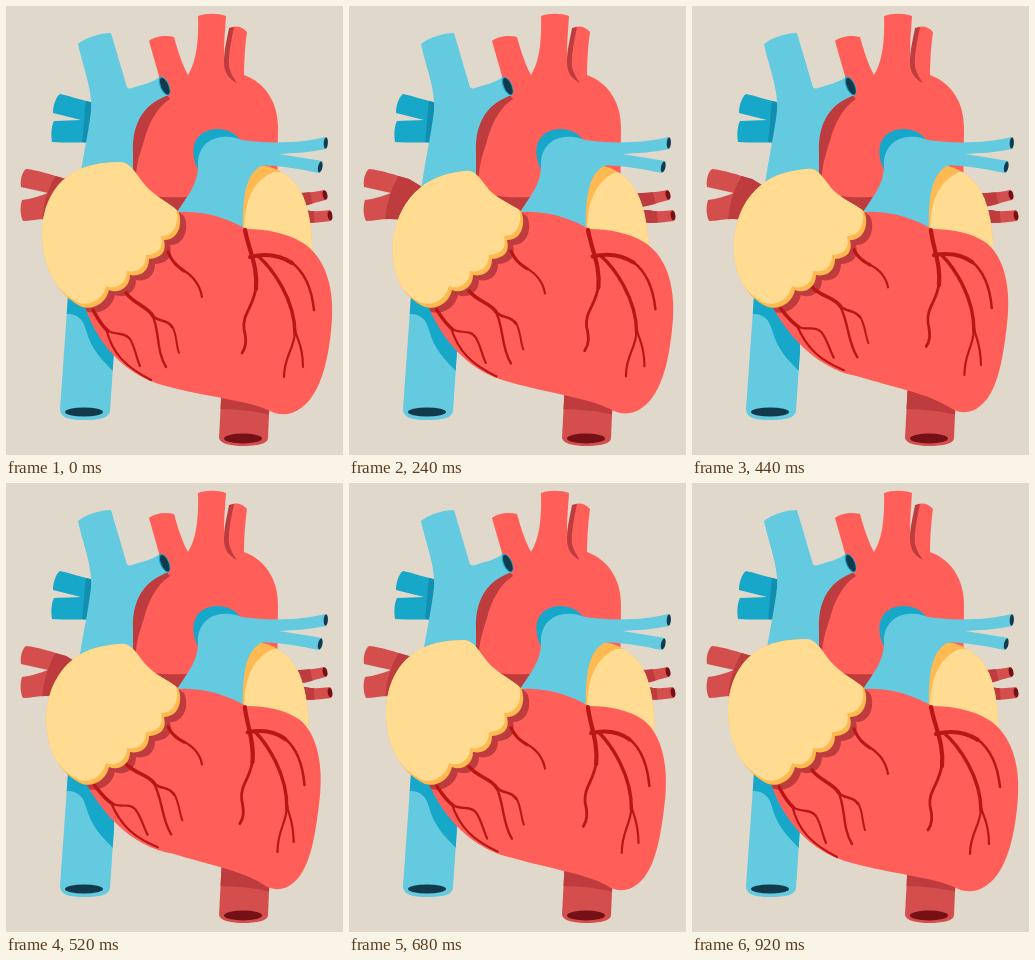
An HTML page with a canvas for the animation above (960 ms loop, 337x449 px).

```html
<!DOCTYPE html>
<html lang="en">
<head>
<meta charset="utf-8">
<title>Beating heart</title>
<style>
html, body { margin: 0; width: 100%; height: 100%; overflow: hidden; background: #e0d8cb; }
canvas { display: block; }
</style>
</head>
<body>
<canvas id="stage" width="337" height="449"></canvas>
<script>
const ctx = document.getElementById('stage').getContext('2d');
const LOOP = 960, STEP = 40;
const C = {
  paper: '#e0d8cb', sky: '#64cae0', teal: '#17a7c9', tealDark: '#128fb0', navy: '#113b4d',
  red: '#ff5f58', brick: '#d44e4e', shade: '#be3c3e', vein: '#ba1616', maroon: '#741016',
  cream: '#ffdc91', amber: '#ffb951'
};

const clamp = x => Math.min(1, Math.max(0, x));
const ease = x => (1 - Math.cos(Math.PI * clamp(x))) / 2;
const pulse = (t, a, b, c, d) => ease((t - a) / (b - a)) - ease((t - c) / (d - c));

// Moves every "x,y" pair of a path through a deformation.
const bend = (d, move) => new Path2D(d.replace(/([\d.]+),([\d.]+)/g, (_, x, y) => move(+x, +y).join()));

function fill(path, color, dx = 0, dy = 0) {
  ctx.save();
  ctx.translate(dx, dy);
  ctx.fillStyle = color;
  ctx.fill(typeof path === 'string' ? new Path2D(path) : path);
  ctx.restore();
}

function inside(path, draw) {
  ctx.save();
  ctx.clip(typeof path === 'string' ? new Path2D(path) : path);
  draw();
  ctx.restore();
}

function hole(x, y, rx, ry, color, turn = 0) {
  ctx.fillStyle = color;
  ctx.beginPath();
  ctx.ellipse(x, y, rx, ry, turn, 0, 2 * Math.PI);
  ctx.fill();
}

const LEFT_VEINS = 'M20,163 C32,164 46,169 60,173 L80,185 L70,214 L40,213 C32,213 24,215 17,215 C14,209 14,200 16,194 C25,193 34,190 42,187 C33,185 24,183 15,181 C14,174 16,166 20,163 Z';
const RIGHT_VEINS = 'M275,188 C292,187 306,187 318,184 C322,186 322,192 320,194 C310,196 303,199 297,200 L275,205 Z M280,204 L299,204 C308,206 316,205 324,204 C327,207 327,213 325,215 C316,216 308,217 300,217 L280,215 Z';
const LOWER_CAVA = 'M62,290 L54,403 C54,412 64,414 78,414 C94,414 103,412 104,405 L108,345 L108,290 Z';
const BOTTOM_TUBE = 'M216,375 L213,432 C214,438 226,440 237,440 C250,440 262,438 262,432 L264,385 Z';
const AORTA = 'M143,35 C149,30 160,29 168,31 C172,46 177,60 182,69 C189,58 193,40 192,10 C200,7 212,7 220,10 C219,28 217,42 219,58 C222,45 222,33 224,22 C230,19 237,21 241,26 C239,40 238,56 238,69 C260,77 272,97 272,122 L271,205 L150,205 L127,172 L127,140 C130,115 152,95 153,70 Z';
const UPPER_CAVA = 'M72,38 C81,31 94,27 105,27 L120,78 C121,83 123,83 126,82 C135,79 146,77 154,71 L163,89 C140,97 126,114 127,146 L127,185 L72,185 C75,160 82,130 85,105 C87,84 76,58 72,38 Z';
const ARTERY = 'M171,206 C181,191 192,178 192,160 C191,144 201,132 216,131 C225,130 230,132 236,134 C262,138 298,137 319,131 C322,134 322,140 320,143 C302,147 287,147 273,148 C288,150 302,153 316,155 C317,159 316,164 313,167 C292,163 266,158 255,160 C240,168 236,190 237,226 C215,220 190,215 171,206 Z';
const RIGHT_ATRIUM = 'M237,230 C228,200 234,162 255,159 C275,162 289,173 297,190 C304,207 307,230 306,252 L260,260 Z';
const RIGHT_ATRIUM_LIGHT = 'M238,230 C238,205 241,178 267,166 L320,165 L320,260 L260,260 Z';
const LEFT_ATRIUM = 'M172,205 C177,215 174,234 158,234 C161,246 155,252 143,253 C143,265 135,271 124,269 C124,282 112,288 103,284 C100,297 88,304 76,301 C50,288 36,260 36,226 C37,200 47,181 62,170 C76,159 96,156 115,156 C124,157 130,167 138,178 C148,190 162,196 172,205 Z';
const VENTRICLE = 'M163,207 C192,202 222,212 240,223 C260,223 281,227 297,237 C319,251 328,281 326,312 C324,350 315,389 295,402 C285,410 272,410 262,404 C240,394 200,391 160,380 C126,372 94,345 79,301 Z';

const VESSELS = [
  [4.2, 'M239,224 C243,245 252,260 250,283'],
  [2.8, 'M250,281 C248,300 236,308 238,323 C241,335 240,341 236,347'],
  [4, 'M244,251 C260,247 275,250 286,257'],
  [2.5, 'M285,256 C300,267 306,285 308,304'],
  [3.4, 'M252,250 C266,262 289,293 289,328'],
  [2.2, 'M289,324 C291,334 297,338 297,361'],
  [2.2, 'M289,326 C288,344 278,350 278,371'],
  [3.2, 'M162,246 C166,256 171,260 178,265'],
  [2.2, 'M177,264 C187,270 194,279 196,291'],
  [3.6, 'M120,287 C128,298 141,300 147,310'],
  [2.4, 'M146,308 C154,325 150,345 160,361'],
  [2.6, 'M146,309 C152,317 161,312 166,321'],
  [2, 'M166,320 C171,328 170,339 173,347'],
  [3.4, 'M87,304 C92,313 95,319 102,325'],
  [2.2, 'M101,324 C108,330 118,325 124,333 C129,341 130,351 134,360'],
  [2.2, 'M100,322 C106,348 120,361 145,374']
];

// Pull towards the scalloped rim, which stays fixed.
const squeezeLeft = amount => (x, y) => {
  const k = amount * Math.max(0, (173 - x) * 94 + (206 - y) * 97) / 11200;
  return [x + 8 * k * clamp((180 - x) / 130), y + 9.6 * k];
};

const squeezeRight = amount => (x, y) => {
  const k = amount * clamp((x - 240) / 60);
  return [x - 6.5 * k, y + 3 * k];
};

// The left and lower walls contract before the right wall does.
const squeezeVentricle = (early, late) => (x, y) => {
  const pull = x < 215 ? early * ease((y - 285) / 85) : late * ease((y - 215) / 50);
  const waist = 3 * late * clamp((x - 270) / 50) * Math.exp(-(((y - 345) / 28) ** 2));
  const lift = early * ease((y - 222) / 75) * clamp((x - 75) / 70) * (10 - 8 * clamp((x - 215) / 50));
  return [x - pull * 0.1 * (x - 215) - waist, y - lift];
};

function drawVeinsBehind() {
  fill(LEFT_VEINS, C.brick);
  inside(LEFT_VEINS, () => fill('M52,166 C43,180 37,196 36,217 L90,217 L90,166 Z', C.shade));
  fill(RIGHT_VEINS, C.brick);
  inside(RIGHT_VEINS, () => fill('M270,180 L302,180 C306,192 308,204 309,220 L270,220 Z', C.shade));
  hole(319, 189, 2.3, 4.6, C.maroon, -0.2);
  hole(324, 209.5, 2.3, 4.6, C.maroon, -0.15);
}

function drawTubes() {
  fill(LOWER_CAVA, C.sky);
  inside(LOWER_CAVA, () =>
    fill('M50,308 L62,308 C71,308 77,313 80,324 C85,343 96,354 108,366 L115,280 L50,280 Z', C.teal));
  hole(78, 406, 19, 4.5, C.navy);

  fill(BOTTOM_TUBE, C.brick);
  inside(BOTTOM_TUBE, () => fill('M210,403 C230,403 250,405 268,410 L268,370 L210,370 Z', C.shade));
  hole(237, 432.5, 19, 5, C.maroon);
}

function drawGreatVessels(right) {
  fill(AORTA, C.red);
  fill('M163,89 C140,97 126,114 127,146 L127,176 C130,188 139,192 150,193 L180,191 L171,208 L127,208 Z', C.red);
  fill('M164,93 C150,102 142,119 138,135 C133,150 129,163 130,178 L124,176 L126,140 C128,112 142,96 160,88 Z', C.shade);
  fill('M130,183 C140,191 160,192 181,191 L170,208 L130,208 Z', C.shade);
  fill('M223,22 L228,21 C225,36 222,50 223,61 C225,68 228,73 231,77 C223,73 218,67 218,56 C218,44 221,33 223,22 Z', C.shade);

  fill('M54,88 C64,90 75,94 88,97 L88,137 C73,136 59,137 46,136 C45,129 45,121 48,115 L75,114 L47,107 C47,99 50,91 54,88 Z', C.teal);
  fill('M80,95 L88,97 L88,137 L76,136 C78,123 78,108 80,95 Z', C.tealDark);
  fill(UPPER_CAVA, C.sky);
  hole(158.5, 80, 4.6, 10, C.teal, -0.42);
  hole(158.8, 80.2, 3.6, 9, C.navy, -0.42);

  fill(right, C.amber);
  inside(right, () => fill(RIGHT_ATRIUM_LIGHT, C.cream));

  fill('M191,162 C182,140 190,124 211,123 C223,123 230,128 236,136 L214,150 Z', C.teal);
  fill(ARTERY, C.sky);
  hole(319.8, 137, 2.1, 5.7, C.navy, 0.05);
  hole(314.2, 161, 2.2, 5.5, C.navy, 0.2);
}

function drawVentricle(squeeze, left) {
  const body = bend(VENTRICLE, squeeze);
  fill(body, C.red);
  inside(body, () => fill(left, C.shade, 6, 5));
  ctx.strokeStyle = C.vein;
  ctx.lineCap = 'round';
  for (const [width, line] of VESSELS) {
    ctx.lineWidth = width;
    ctx.stroke(bend(line, squeeze));
  }
}

function draw(t) {
  const atria = pulse(t, 0, 250, 270, 800);
  const early = pulse(t, 80, 470, 470, 910);
  const late = pulse(t, 130, 540, 580, 920);
  const left = bend(LEFT_ATRIUM, squeezeLeft(atria));
  const right = bend(RIGHT_ATRIUM, squeezeRight(atria));

  ctx.fillStyle = C.paper;
  ctx.fillRect(0, 0, 337, 449);
  drawVeinsBehind();
  drawTubes();
  drawGreatVessels(right);
  drawVentricle(squeezeVentricle(early, late), left);
  fill(left, C.amber);
  inside(left, () => fill(left, C.cream, -3, -4));
}

const start = performance.now();
function tick() {
  const t = (performance.now() - start) % LOOP;
  draw(Math.floor(t / STEP) * STEP);
  requestAnimationFrame(tick);
}
tick();
</script>
</body>
</html>
```
